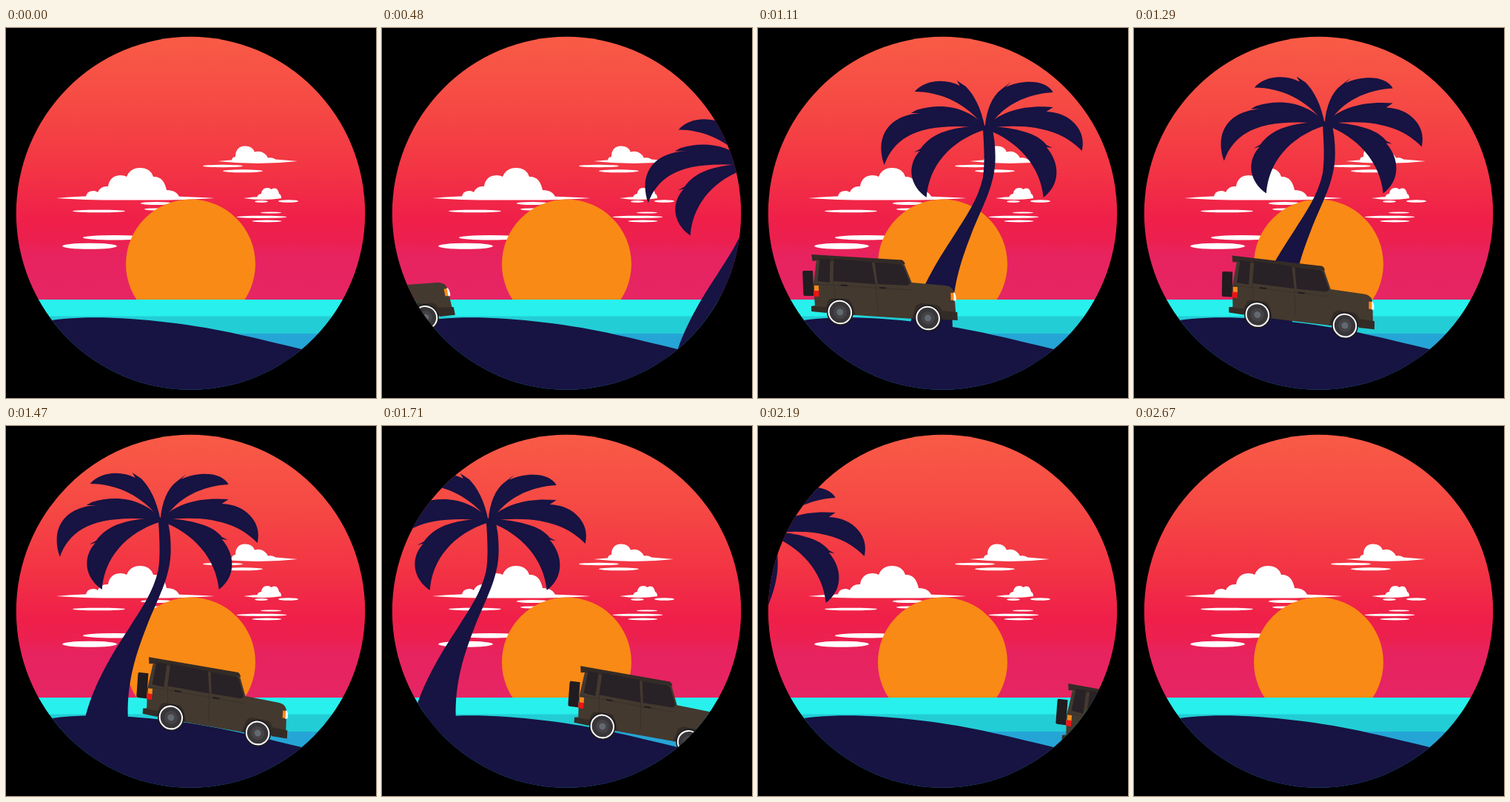
An HTML page without scripts that plays this animation: 500x500 px, repeating every 2700 ms.

```html
<!DOCTYPE html>
<html lang="en">
<head>
<meta charset="utf-8">
<title>Sunset drive</title>
<style>
  html, body { margin: 0; width: 100%; height: 100%; overflow: hidden; background: #000; }
  svg { display: block; width: 100vw; height: 100vh; }
  .night { fill: #171342; }
  .cloud { fill: #fff; }
  .body { fill: #43392f; }
  .trim { fill: #332b26; }
  .glass { fill: #282126; }
</style>
</head>
<body>
<svg viewBox="0 0 500 500">
  <defs>
    <linearGradient id="sky" gradientUnits="userSpaceOnUse" x1="0" y1="12" x2="0" y2="366">
      <stop offset="0" stop-color="#f95b46"/>
      <stop offset=".28" stop-color="#f54844"/>
      <stop offset=".5" stop-color="#f33544"/>
      <stop offset=".7" stop-color="#ef1f49"/>
      <stop offset=".78" stop-color="#ec204f"/>
      <stop offset=".83" stop-color="#e7235f"/>
      <stop offset="1" stop-color="#e62564"/>
    </linearGradient>
    <clipPath id="porthole"><ellipse cx="249.5" cy="250.3" rx="235.7" ry="238.5"/></clipPath>
    <g id="wheel">
      <circle r="18" fill="#1e1a1d"/>
      <circle r="15.3" fill="#393639" stroke="#fff" stroke-width="2"/>
      <circle r="9" fill="#454346"/>
      <circle r="4.5" fill="#626970"/>
    </g>
  </defs>

  <g clip-path="url(#porthole)">
    <rect width="500" height="368" fill="url(#sky)"/>

    <g class="cloud">
      <path d="M68 230Q110 226 175 227Q240 227 282 230Q235 233 175 232.5Q110 233 68 230Z"/>
      <path d="M108 230q0-10 10-10q4 0 6 2q4-9 14-8q2-14 16-15q6 0 9 2q5-12 18-12q14 0 18 12q14-1 18 18q14 0 18 11z"/>
      <ellipse cx="125.5" cy="247.5" rx="35.5" ry="1.8"/>
      <ellipse cx="203" cy="237" rx="21" ry="2"/>
      <ellipse cx="207" cy="245" rx="20" ry="1.6"/>
      <ellipse cx="146" cy="283.3" rx="42" ry="3.2"/>
      <ellipse cx="113" cy="294.8" rx="37" ry="4"/>

      <path d="M286 180Q340 174 394 180Q340 186 286 180Z"/>
      <path d="M305 180q0-6 5-6q0-14 13-14.5q10 0 13 8q12-3 18 8q9-1 12 4.5z"/>
      <ellipse cx="293" cy="186.5" rx="27" ry="1.7"/>
      <ellipse cx="320" cy="193.3" rx="27" ry="2"/>

      <path d="M321 230Q347 226 373 230Q347 234 321 230Z"/>
      <path d="M339 230q1-6 6-6q1-8 8-8q4 0 5 2q9-5 11 6q3 1 3 6z"/>
      <ellipse cx="345" cy="234.5" rx="9" ry="1.5"/>
      <ellipse cx="381.5" cy="234" rx="13.5" ry="1.8"/>
      <ellipse cx="358" cy="249.5" rx="14" ry="1"/>
      <ellipse cx="345.5" cy="255.3" rx="34" ry="1.6"/>
      <ellipse cx="352.5" cy="261" rx="20" ry="1.5"/>
    </g>

    <circle cx="249.5" cy="319" r="87.5" fill="#fa8a16"/>

    <rect y="367" width="500" height="23" fill="#28f0ec"/>
    <rect y="389.5" width="500" height="24" fill="#22cdd6"/>
    <rect y="413" width="500" height="87" fill="#25a5d6"/>

    <!-- palm, drawn around its crown -->
    <g class="night">
      <animateTransform attributeName="transform" type="translate" dur="2.7s" repeatCount="indefinite"
        keyTimes="0;.1444;.2889;.35;.4111;.4778;.5444;.6333;.7222;.8111;1"
        values="645 230;524 192;407 160;357 145;308 133;259 127.5;210 125;145 126;80 132;14 143;-126 172"/>
      <path d="M-4 0C-2 30 -1 52 -4 70C-11 100 -27 122 -42 146C-67 184 -90 222 -102 266L-106 290H-44L-45 266C-46 220 -34 183 -20 147C-5 108 13 80 13 42Q13 18 8 0Z"/>
      <path d="M-1 2C-6 -25 -16 -43 -27 -54L-39 -62L-35 -55C-56 -66 -84 -62 -96 -47C-60 -47 -24 -30 -1 2Z"/>
      <path d="M0 0C-22 -24 -56 -34 -94 -22L-101 -18L-84 -18C-124 -18 -152 8 -137 52C-123 14 -90 -7 0 2Z"/>
      <path d="M0 -1C-45 0 -72 8 -88 30L-97 35L-89 33C-108 54 -102 81 -80 96C-77 55 -50 20 0 4Z"/>
      <path d="M-1 1C1 -22 8 -40 21 -50L34 -60L27 -53C51 -64 82 -63 91 -46C56 -44 22 -29 4 2Z"/>
      <path d="M0 0C22 -21 52 -29 91 -26L82 -20C114 -19 137 5 130 33C106 8 68 -6 2 2Z"/>
      <path d="M1 -1C42 2 70 9 82 25L90 29L82 28C101 50 101 79 78 96C74 54 44 20 1 4Z"/>
    </g>

    <path class="night" d="M10 407L40 399C90 388 150 390 220 398S340 420 420 439V500H10Z"/>

    <!-- car, pivoting on its rear axle -->
    <g>
      <animateTransform attributeName="transform" type="translate" dur="2.7s" repeatCount="indefinite"
        keyTimes="0;.2889;.35;.4111;.4778;.5444;.6333;.8111;1"
        values="-190 420;22 391;66 387;111 384;167 387.5;223 394;298 406;449 430;610 456"/>
      <animateTransform attributeName="transform" type="rotate" additive="sum" dur="2.7s" repeatCount="indefinite"
        keyTimes="0;.2889;.4111;.5444;.6333;1" values="-14;-6.2;0;6.3;6.5;6.5"/>
      <g transform="skewX(2.3) translate(-111 -384)">
        <path d="M64 328H76V362H64Q62 362 62 360V330Q62 328 64 328Z" fill="#211c20"/>
        <path class="body" d="M82 310L198 314L209 344L254 348Q266 349 266 361L267 388L209 393L130 388L72 382V376L77 375L76 348Z"/>
        <path class="trim" d="M75 306L197 313.5Q200 315 201 319L83 314L76 315Z"/>
        <g class="glass">
          <path d="M86 312L100 312.5L98 344L82 342Z"/>
          <path d="M105 312L156 316L160 346L103 342Z"/>
          <path d="M160 317L195 319Q198 320 199 323L207 345L203 348L163 346Z"/>
        </g>
        <path d="M103 342L105 366M160 346L162 384M77 346L208 354" fill="none" stroke="#393029" stroke-width=".8"/>
        <path d="M113 347.5L122 348M165 351L174 351.5" stroke="#211c20" stroke-width="2"/>
        <path d="M77 348H83V356H77Z" fill="#f98a1a"/>
        <path d="M76 355H83V363H76Z" fill="#ee1414"/>
        <path d="M261 358H265.5V368H261Z" fill="#f98a1a"/>
        <path d="M265 357Q268.5 358 268 368L265 369Z" fill="#fff"/>
        <g class="trim">
          <path d="M72 376L92 377V385L72 383Z"/>
          <path d="M249 382L269 384V395L248 394Z"/>
          <path d="M89 384L95 369Q97 365 103 365L121 366Q127 367 131 388Z"/>
          <path d="M207 393L213 376Q216 372 222 372L241 374Q248 375 252 393Z"/>
        </g>
        <use href="#wheel" x="110.5" y="384"/>
        <use href="#wheel" x="229" y="392"/>
      </g>
    </g>
  </g>
</svg>
</body>
</html>
```
